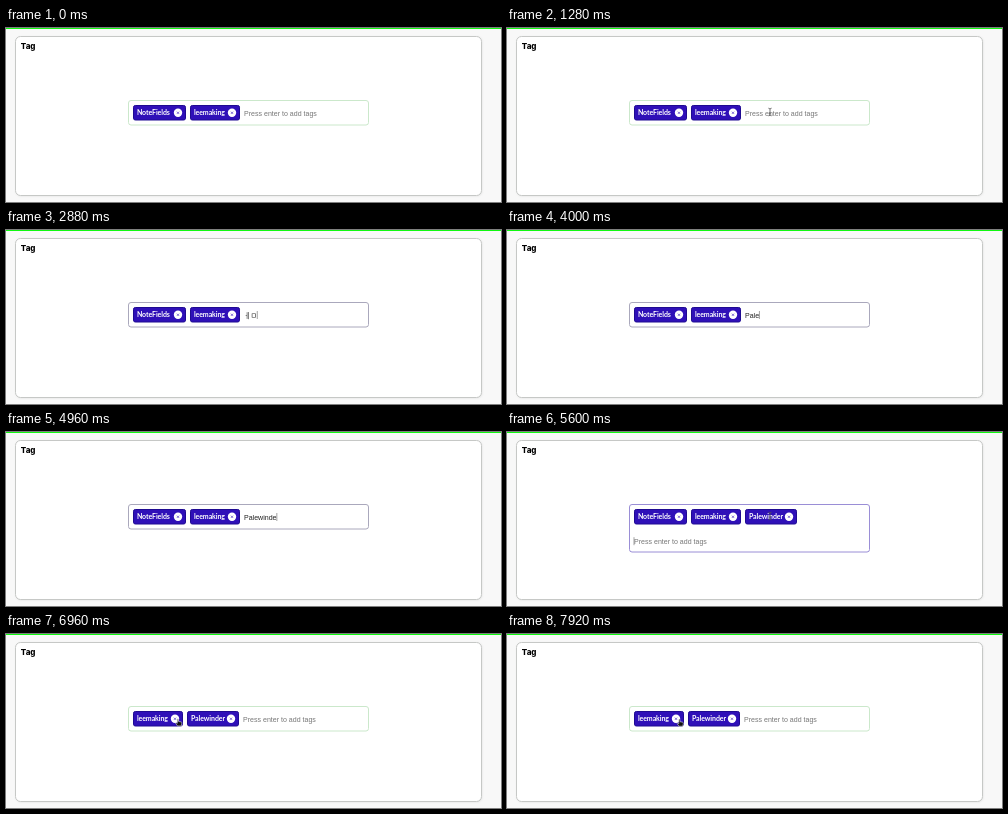
Write an HTML page that moves like this. It is 495x174 px and loops after 8000 ms.

```html
<!DOCTYPE html>
<html lang="en">
<head>
<meta charset="utf-8">
<style>
html, body { margin: 0; width: 100%; height: 100%; overflow: hidden; background: #f8f8f8; }
svg { display: block; width: 495px; height: 174px; }
.title { font: 800 8px Inter, sans-serif; }
.chip text { font: 700 7px Lato, sans-serif; letter-spacing: -.08px; fill: #fff; }
.chip rect { fill: #2f10b8; stroke: #1f0a92; }
.field { font: 7.06px "Liberation Sans", "Noto Sans CJK KR", "Noto Sans CJK", sans-serif; }
</style>
</head>
<body>
<svg viewBox="0 0 495 174">
  <defs>
    <filter id="soft" x="-5%" y="-5%" width="110%" height="115%"><feGaussianBlur stdDeviation="1"/></filter>
  </defs>
  <rect width="495" height="174" fill="#f8f8f8"/>
  <rect width="495" height="1" fill="#10f810"/>
  <rect x="10" y="9" width="466" height="159" rx="5" fill="#ddd" filter="url(#soft)"/>
  <rect x="9.5" y="8.5" width="466" height="159" rx="5" fill="#fff" stroke="#c6c8c6"/>
  <text class="title" x="14.8" y="20.6">Tag</text>
  <rect id="box" x="122.5" y="72.5" width="240" rx="2.5" fill="#fff"/>
  <g id="chips"></g>
  <text id="field" class="field"></text>
  <path id="caret" d="M0 0v8" stroke="#444" stroke-width=".5"/>
  <g id="cursor" stroke-linejoin="round">
    <path id="arrow" d="M0 0v7.4l1.7-1.6 1.2 2.6 1.1-.5-1.1-2.5h2.3z" fill="#111" stroke="#fff" stroke-width=".6"/>
    <path id="beam" d="M-1.6-3.8Q0-3.8 0-2.6Q0-3.8 1.6-3.8M0-2.6V2.6M-1.6 3.8Q0 3.8 0 2.6Q0 3.8 1.6 3.8M-.9 1.2H.9" fill="none" stroke-width=".8"/>
    <path id="hand" d="M-.6 0Q0-.7.6 0V2.3L3.3 2.9Q4 3.1 3.9 4L3.4 6.8H-.4L-2.3 4.2Q-2.2 3.3-.6 4.2z" fill="#111" stroke="#fff" stroke-width=".5"/>
  </g>
</svg>
<script>
const LOOP = 8000, STEP = 80;
const FOCUS = 1520, ENTER = 5200, REMOVE = 6640;
const $ = id => document.getElementById(id);
const set = (el, attrs) => { for (const k in attrs) el.setAttribute(k, attrs[k]); };
const show = (el, on) => set(el, { visibility: on ? "visible" : "hidden" });

const tags = [["NoteFields", 53], ["leemaking", 50], ["Palewinder", 52]].map(([name, w]) => {
  const el = document.createElementNS("http://www.w3.org/2000/svg", "g");
  el.setAttribute("class", "chip");
  const c = w - 8;
  el.innerHTML = `<rect x=".5" y="77.5" width="${w - 1}" height="14.5" rx="1.8"/>
    <text x="3.9" y="87.2">${name}</text>
    <circle cx="${c}" cy="84.8" r="4.2" fill="#fff"/>
    <path d="M${c - 1.1} 83.7l2.2 2.2m0-2.2l-2.2 2.2" stroke="#2f10b8" stroke-width=".6"/>`;
  $("chips").append(el);
  return { el, w };
});

// [time, field content]
const word = "Palewinder";
const typing = [[FOCUS, ""], [2480, "ㅔ"], [2640, "ㅔㅁ"], [3120, "ㅔ"], [3200, ""]];
[3440, 3600, 3760, 3920, 4320, 4480, 4640, 4800, 4960, 5040]
  .forEach((at, i) => typing.push([at, word.slice(0, i + 1)]));
typing.push([ENTER, ""]);

// [time, x, y]
const path = [[240, 291, 154], [960, 263, 84], [5600, 263, 84], [6240, 164, 87], [6480, 171.8, 85], [8000, 172.4, 85.4]];

function place(t) {
  const i = Math.max(1, path.findIndex(p => p[0] >= t));
  const [a, x, y] = path[i - 1], [b, u, v] = path[i];
  const k = Math.min(1, Math.max(0, (t - a) / (b - a))), e = k * k * (3 - 2 * k);
  return [x + (u - x) * e, y + (v - y) * e];
}

function draw(t) {
  const focused = t >= FOCUS && t < REMOVE;
  const tall = t >= ENTER && t < REMOVE;
  set($("box"), { height: tall ? 47.5 : 24.5, stroke: tall ? "#9a8ed6" : focused ? "#aaa8bc" : "#cbe8cb" });

  let x = 127;
  tags.forEach(({ el, w }, i) => {
    const on = i == 0 ? t < REMOVE : i == 1 || t >= ENTER;
    show(el, on);
    if (!on) return;
    set(el, { transform: `translate(${x})` });
    x += w + 4;
  });

  const last = typing.filter(s => s[0] <= t).pop() || [0, ""];
  const text = last[1], left = tall ? 127 : x, mid = tall ? 109.2 : 85;
  const field = $("field");
  field.textContent = text || "Press enter to add tags";
  set(field, { x: left, y: mid + 2.6, fill: text ? "#222" : "#777" });
  const end = left + (text ? field.getComputedTextLength() + .3 : 0);
  set($("caret"), { transform: `translate(${end} ${mid - 4})` });
  show($("caret"), focused && (t - last[0]) % 1000 < 520);

  const [cx, cy] = place(t);
  const visible = t >= 240 && t < 2480 || t >= 5600;
  const kind = t >= 6400 ? "hand" : cy > 98 ? "arrow" : "beam";
  set($("cursor"), { transform: `translate(${cx} ${cy})` });
  for (const k of ["arrow", "beam", "hand"]) show($(k), visible && k == kind);
  set($("beam"), { stroke: cx < 180 ? "#ddd" : "#555" });
}

const start = performance.now();
function frame() {
  const t = (performance.now() - start) % LOOP;
  draw(Math.floor(t / STEP) * STEP);
  requestAnimationFrame(frame);
}
frame();
</script>
</body>
</html>
```
